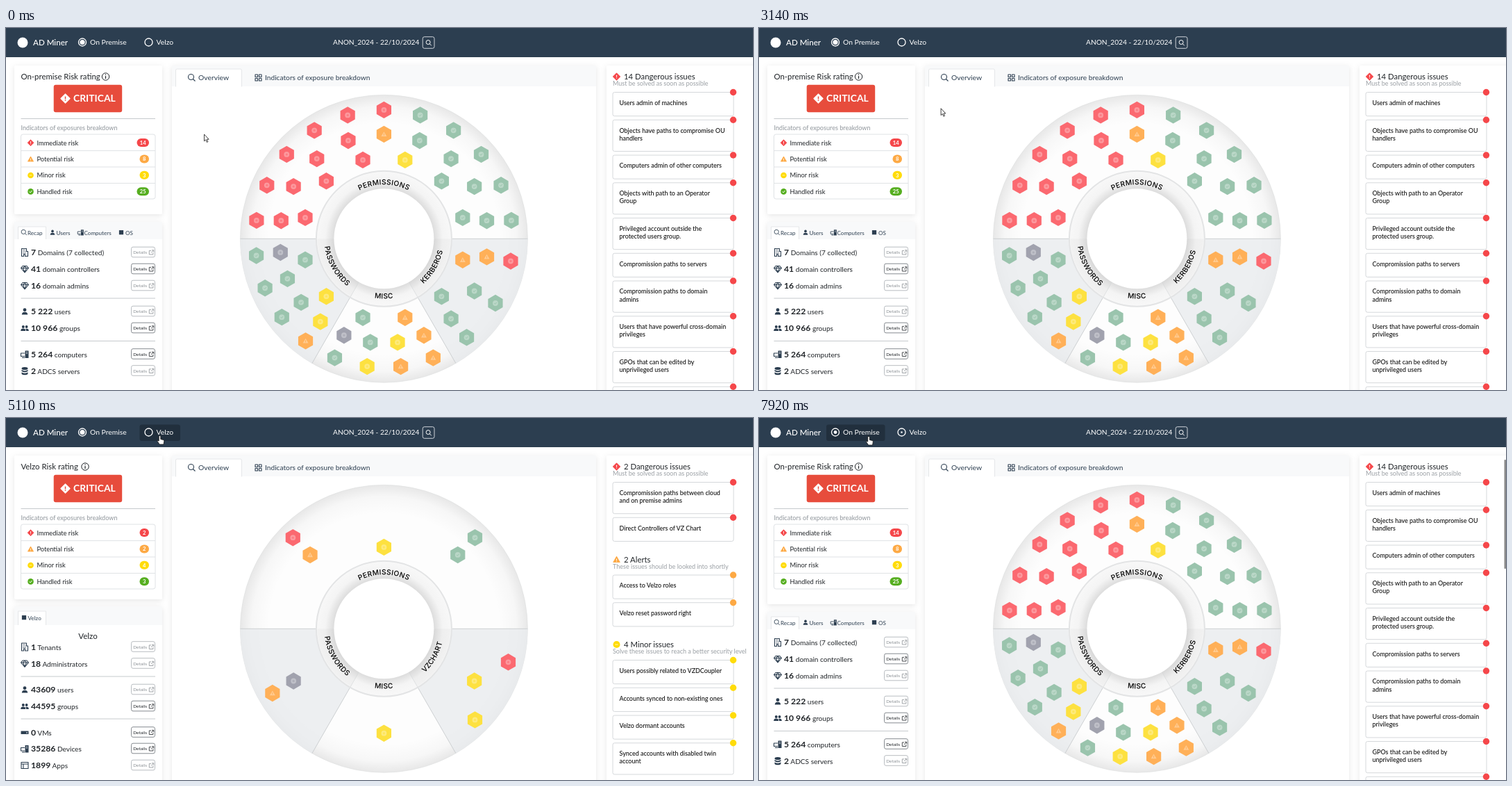
Recreate the animation shown at these times as an HTML page. Size 1076 px wide and 521 px high, loop 7.99 s.

```html
<!DOCTYPE html>
<html lang="en">
<head>
<meta charset="utf-8">
<title>AD Miner dashboard</title>
<style>
  html, body { margin: 0; width: 100%; height: 100%; overflow: hidden; background: #fff; }
  svg { display: block; width: 100vw; height: 100vh; font-family: Lato, sans-serif; }
  .card { fill: #fff; filter: drop-shadow(0 2px 4px rgba(0,0,0,.1)); }
  .line { fill: none; stroke: #2c3e50; stroke-width: 1.1; stroke-linejoin: round; }
  .arc { font: 500 10.2px Inter, sans-serif; letter-spacing: .35px; text-anchor: middle; }
</style>
</head>
<body>
<svg id="stage" viewBox="0 0 1076 521"></svg>
<script>
const LOOP = 7990, CX = 544.4, CY = 303.3, NAVY = '#2c3e50', INK = '#212529', MUTED = '#8f959b';
const RISK = { r: '#f5474a', o: '#fda944', y: '#ffdc0a', g: '#56ae20' };
const HEX = { r: '#fb6970', o: '#ffb058', y: '#fde140', g: '#9ac4ad', x: '#a1a2ae' };

const text = (x, y, s, size, fill = NAVY, extra = '') =>
  `<text x="${x}" y="${y}" font-size="${size}" fill="${fill}" ${extra}>${s}</text>`;
const rect = (x, y, w, h, fill, extra = '') =>
  `<rect x="${x}" y="${y}" width="${w}" height="${h}" fill="${fill}" ${extra}/>`;
const circle = (x, y, r, fill, extra = '') =>
  `<circle cx="${x}" cy="${y}" r="${r}" fill="${fill}" ${extra}/>`;
const path = (d, extra = '') => `<path d="${d}" ${extra}/>`;
const at = (x, y, body, scale = 1) => `<g transform="translate(${x} ${y}) scale(${scale})">${body}</g>`;
const polar = (r, deg) => [CX + r * Math.cos(deg * Math.PI / 180), CY + r * Math.sin(deg * Math.PI / 180)];
const rule = y => path(`M21.5 ${y}H215`, 'stroke="#c6cacd"');

// Outline icons, centred on 0,0 in a box of about 12 px
const line = d => path(d, 'class="line"');
const solid = d => path(d, `fill="${NAVY}"`);
const ICONS = {
  search: line('M2 2L5 5M3 -1A4 4 0 1 1 -5 -1A4 4 0 1 1 3 -1'),
  grid: line('M-4.5-4.5h3.5v3.5h-3.5zM1-4.5h3.5v3.5H1zM1 1h3.5v3.5H1zM-4.5 1h3.5v3.5h-3.5z'),
  building: line('M-4.5 5.5v-11h7v4h2v7h-4v-3h-2v3z') +
    path('M-2.5-3.5h3M-2.5-1.2h4.5M-2.5 1h4.5', 'class="line" stroke-dasharray="1.2 .8"'),
  gem: line('M-3-4.5h6l2.5 3L0 5l-5.5-6.5zM-5.5-1.5h11M-2.5-1.5L0 4.5 2.5-1.5 0-4.5z'),
  person: circle(0, -2.3, 2.4, NAVY) + solid('M-4.2 4.5q0-3.8 4.2-3.8t4.2 3.8z'),
  people: circle(-2.2, -2, 2, NAVY) + circle(2.6, -2, 1.9, NAVY) + solid('M-5.8 4q0-3.4 3.5-3.4T1.2 4zM2 4q0-2-1-3 4.8-1 4.8 3z'),
  computer: line('M0-1.5h-5.5v4.5H0M-4 5h4') + solid('M.5-5h5v10.5h-5z') + path('M2-3h2M2-1h2', 'stroke="#fff" stroke-width=".8"'),
  database: solid('M-4.5-3.5q0-2 4.5-2t4.5 2-4.5 2-4.5-2zm0 2q4.5 2.8 9 0v2q-4.5 2.8-9 0zm0 3.5q4.5 2.8 9 0v1.8q0 2-4.5 2t-4.5-2z'),
  drive: solid('M-5.5-2h11v4.5h-11z') + path('M2 .5h2', 'stroke="#fff"'),
  panel: line('M-5-4.5H5v9H-5zM-5-2H5M-2-2v6.5'),
  square: rect(-4, -4, 8, 8, NAVY)
};
const icon = (name, x, y, scale = 1) => at(x, y, ICONS[name], scale);

function riskIcon(kind, x, y, size, fill = RISK[kind], mark = '#fff') {
  const stroke = `fill="none" stroke="${mark}" stroke-width="1.3"`;
  const bang = path('M0-2.6V.6M0 1.6V2.9', stroke);
  const shape = {
    r: path('M0-5.8L5.8 0 0 5.8-5.8 0z', `fill="${fill}" stroke="${fill}" stroke-linejoin="round"`) + bang,
    o: path('M0-4.8L5.3 4.5H-5.3z', `fill="${fill}" stroke="${fill}" stroke-linejoin="round"`) + at(0, 1.2, bang, .85),
    y: circle(0, 0, 5.6, fill) + path('M-2.4 0h4.8', stroke + ' opacity=".6"'),
    g: circle(0, 0, 5.6, fill) + path('M-2.5 0L-.6 2 2.6-1.8', stroke)
  };
  return at(x, y, shape[kind], size / 6);
}

function hexagon(kind, x, y) {
  const glyph = kind === 'o'
    ? path('M0-3.6L4 3.2H-4z', 'fill="#fff" opacity=".34"') + path('M0-1.2V2', 'stroke="#ffb058"')
    : circle(0, 0, 3.9, '#fff', 'opacity=".32"') + (kind === 'g'
      ? path('M-1.7 0L-.4 1.3 1.8-1.2', 'fill="none" stroke="#9ac4ad"')
      : circle(0, 0, 1.5, HEX[kind], 'opacity=".6"'));
  return at(x, y, path('M0-12.2L10.6-6.1V6.1L0 12.2-10.6 6.1V-6.1z', `fill="${HEX[kind]}"`) + glyph);
}

function wedge(from, to, r, fill) {
  return path(`M${CX} ${CY}L${polar(r, from)}A${r} ${r} 0 0 1 ${polar(r, to)}z`, `fill="${fill}"`);
}

let arcCount = 0;
function arcLabel(label, mid, r, turn) {
  const id = 'arc' + arcCount++;
  return path(`M${polar(r, mid - 70 * turn)}A${r} ${r} 0 0 ${turn > 0 ? 1 : 0} ${polar(r, mid + 70 * turn)}`, `id="${id}" fill="none"`) +
    `<text class="arc"><textPath href="#${id}" startOffset="50%">${label}</textPath></text>`;
}

// Each sector: label, start angle, span, rows of hexagons from the rim inwards
function wheel(sectors) {
  const shade = 'rgba(234,236,239,.78)';
  let out = circle(CX, CY, 207, '#fdfdfd') + circle(CX, CY, 207, 'url(#rim)', 'stroke="#dedfe0" stroke-width=".6"') +
    wedge(0, 60, 207, shade) + wedge(120, 180, 207, shade);
  for (const a of [0, 60, 120, 180]) out += path(`M${polar(98, a)}L${polar(207, a)}`, 'stroke="#cdd0d2"');
  out += circle(CX, CY, 98, 'url(#ring)') + wedge(0, 60, 96, 'rgba(0,0,0,.025)') + wedge(120, 180, 96, 'rgba(0,0,0,.025)');
  for (const a of [60, 120]) out += path(`M${polar(72, a)}L${polar(97, a)}`, 'stroke="#d6d8da" stroke-width=".7"');
  out += circle(CX, CY, 97.5, 'none', 'stroke="#e3e4e5" stroke-width="2"') + circle(CX, CY, 72, '#fff');
  for (const [label, start, span, ...rows] of sectors) {
    out += span > 90 ? arcLabel(label, 270, 78, 1) : arcLabel(label, start + span / 2, 86.2, -1);
    rows.forEach((row, i) => [...row].forEach((kind, k) => {
      out += hexagon(kind, ...polar([185.4, 150.4, 117.4][i], start + (k + .5) * span / row.length));
    }));
  }
  return out;
}

function ratingCard(title, infoX, bottom, counts) {
  let out = rect(12, 54, 213, bottom - 54, '#fff', 'class="card" rx="2"') +
    text(21.5, 74, title, 11.4, INK) + circle(infoX, 70, 5.2, 'none', `stroke="${INK}"`) +
    path(`M${infoX} 69v4M${infoX} 66.6v1.2`, `stroke="${INK}" stroke-width="1.2"`) +
    rect(68.7, 81.8, 98.5, 39.4, '#e74c3c', 'rx="3"') + riskIcon('r', 85.5, 101.5, 6.8, '#fff', '#e74c3c') +
    text(97, 106.4, 'CRITICAL', 13.9, '#fff', 'font-weight="700"') + rule(130.5) +
    text(21.5, 146.5, 'Indicators of exposures breakdown', 9.1, MUTED) +
    rect(21.5, 153, 193.5, 93, '#fff', 'rx="3" stroke="#dfe2e5"');
  ['Immediate risk', 'Potential risk', 'Minor risk', 'Handled risk'].forEach((name, i) => {
    const y = 165 + i * 23.4, kind = 'royg'[i], w = counts[i] > 9 ? 17.5 : 13.5;
    if (i) out += path(`M21.5 ${y - 11.8}H215`, 'stroke="#dfe2e5"');
    out += riskIcon(kind, 35.5, y + .2, 4.6) + text(44.5, y + 3.6, name, 9.3, INK) +
      rect(206 - w, y - 6, w, 12, RISK[kind], 'rx="6"') +
      text(206 - w / 2, y + 2.8, counts[i], 7.6, '#fff', 'font-weight="700" text-anchor="middle"');
  });
  return out;
}

function statRow(y, symbol, value, label, active) {
  const color = active ? INK : '#8b9095';
  return icon(symbol, 27, y) + `<text x="36" y="${y + 4.3}" font-size="10.1" fill="${INK}">` +
    `<tspan font-size="12.2" font-weight="700">${value}</tspan> ${label}</text>` +
    rect(180.5, y - 7.8, 34, 14.6, '#fff', `rx="2.5" stroke="${active ? '#868b90' : '#b9bdc1'}"`) +
    text(183.2, y + 2, 'Details', 6.5, color) +
    path(`M209 ${y - 2.6}h-2.7v5.6h5.6v-2.7M210 ${y - 3.2}h2.7v2.7M212.5 ${y - 3}l-3.6 3.6`, `fill="none" stroke="${color}" stroke-width=".8"`);
}

function statsCard(top, stripBottom, tabs, rows, rules) {
  let out = rect(12, top, 213, 260, '#fff', 'class="card" rx="2"') + rect(12, top, 213, stripBottom - top, '#f8f9fa') +
    path(`M17.5 ${stripBottom}V${top + 7}H57.5V${stripBottom}`, 'fill="#fff" stroke="#e5e7e9"');
  const y = (top + 7 + stripBottom) / 2 - .8;
  for (const [symbol, x, name, labelX] of tabs) out += icon(symbol, x, y, .78) + text(labelX, y + 3.3, name, 8.1);
  return out + rows.map(r => statRow(...r)).join('') + rules.map(rule).join('');
}

// Each section: risk kind, title, note, issues with "|" as line break
function issuePanel(sections) {
  let out = rect(865, 54, 230, 480, '#fff', 'class="card"'), y = 70;
  for (const [kind, title, note, issues] of sections) {
    out += riskIcon(kind, 879.5, y, 5.4) + text(890, y + 4.2, title, 11.35, INK) + text(874, y + 13.3, note, 9.02, '#9a9fa4');
    y += 22.5;
    for (const issue of issues) {
      const lines = issue.split('|'), h = 23.2 + lines.length * 11;
      out += rect(874, y, 174, h, '#fff', 'rx="2.5" stroke="#d5d8db"') + circle(1047.5, y, 4.7, RISK[kind]);
      lines.forEach((s, i) => out += text(883.5, y + 18.3 + i * 11.4, s, 8.95, '#111', 'font-weight="500"'));
      y += h + 5.55;
    }
    y += 20.5;
  }
  return out;
}

const premise = ratingCard('On-premise Risk rating', 143.5, 268, [14, 8, 3, 25]) +
  statsCard(279, 304, [['search', 26, 'Recap', 31], ['person', 67, 'Users', 72.5], ['computer', 107.5, 'Computers', 112.5], ['square', 166, 'OS', 172]], [
    [323, 'building', '7', 'Domains (7 collected)', 0], [347, 'gem', '41', 'domain controllers', 1],
    [371, 'gem', '16', 'domain admins', 0], [408, 'person', '5 222', 'users', 0],
    [432, 'people', '10 966', 'groups', 1], [469.5, 'computer', '5 264', 'computers', 1],
    [493.5, 'database', '2', 'ADCS servers', 0]], [389, 450.5]) +
  wheel([['PERMISSIONS', 180, 180, 'rrrrrrggggg', 'rrrrogggg', 'rrrygg'], ['KERBEROS', 0, 60, 'rgg', 'ogg', 'og'],
    ['MISC', 60, 60, 'ooyg', 'oygx', 'og'], ['PASSWORDS', 120, 60, 'oggg', 'yggx', 'yg']]) +
  issuePanel([['r', '14 Dangerous issues', 'Must be solved as soon as possible', [
    'Users admin of machines', 'Objects have paths to compromise OU|handlers', 'Computers admin of other computers',
    'Objects with path to an Operator|Group', 'Privileged account outside the|protected users group.',
    'Compromission paths to servers', 'Compromission paths to domain|admins',
    'Users that have powerful cross-domain|privileges', 'GPOs that can be edited by|unprivileged users', '']]]);

const cloud = ratingCard('Velzo Risk rating', 114, 261, [2, 2, 4, 3]) +
  statsCard(271, 298, [['square', 26, 'Velzo', 31.5]], [
    [329.5, 'building', '1', 'Tenants', 0], [353.5, 'gem', '18', 'Administrators', 0],
    [391, 'person', '43609', 'users', 0], [415, 'people', '44595', 'groups', 1],
    [452.5, 'drive', '0', 'VMs', 1], [476, 'computer', '35286', 'Devices', 1],
    [500, 'panel', '1899', 'Apps', 0]], [372, 433]) + text(118, 318, 'Velzo', 11.5, INK, 'text-anchor="middle"') +
  wheel([['PERMISSIONS', 180, 180, 'rg', 'og', 'y'], ['VZCHART', 0, 60, 'ry', 'y'],
    ['MISC', 60, 60, '', 'y'], ['PASSWORDS', 120, 60, 'o', 'x']]) +
  issuePanel([
    ['r', '2 Dangerous issues', 'Must be solved as soon as possible', ['Compromission paths between cloud|and on premise admins', 'Direct Controllers of VZ Chart']],
    ['o', '2 Alerts', 'These issues should be looked into shortly', ['Access to Velzo roles', 'Velzo reset password right']],
    ['y', '4 Minor issues', 'Solve these issues to reach a better security level', ['Users possibly related to VZDCoupler',
      'Accounts synced to non-existing ones', 'Velzo dormant accounts', 'Synced accounts with disabled twin|account']]]);

const radio = (x, id) => circle(x, 20.5, 5.5, 'none', 'stroke="#fff" stroke-width="1.3"') + circle(x, 20.5, 0, '#fff', `id="${id}"`);
const stage = document.getElementById('stage');
stage.innerHTML = `<defs>
  <radialGradient id="rim"><stop offset=".8" stop-opacity="0"/><stop offset=".92" stop-opacity=".025"/><stop offset="1" stop-opacity=".085"/></radialGradient>
  <radialGradient id="ring"><stop offset=".73" stop-color="#dcdcdc"/><stop offset=".86" stop-color="#f4f4f4"/><stop offset="1" stop-color="#f8f8f8"/></radialGradient>
  </defs>` +
  rect(239, 54, 611, 480, '#fff', 'class="card"') + rect(239, 54, 611, 30, '#f8f9fa') +
  path('M244.5 84.5V61q0-2 2-2h91q2 0 2 2v23.5', 'fill="#fff" stroke="#e5e7e9"') +
  icon('search', 267.5, 71.5) + text(277, 75.2, 'Overview', 10.35) +
  icon('grid', 363.5, 71.5) + text(373, 75.2, 'Indicators of exposure breakdown', 10.2) +
  `<g id="premise">${premise}</g><g id="cloud">${cloud}</g>` +
  rect(1073.5, 60, 2.5, 157, '#8b8b8b', 'id="scrollbar" rx="1"') +
  rect(0, 0, 1076, 42, NAVY) +
  rect(97, 9.5, 84.5, 23.5, '#212f3d', 'id="premiseHover" rx="3"') + rect(192.5, 9.5, 58.5, 23.5, '#212f3d', 'id="cloudHover" rx="3"') +
  circle(24, 21, 7.5, '#fff') + text(39, 24.8, 'AD Miner', 11.6, '#fff', 'font-weight="500"') +
  radio(110, 'premiseDot') + text(121, 24.3, 'On Premise', 10.35, '#fff') +
  radio(205.5, 'cloudDot') + text(216.5, 24.3, 'Velzo', 10.35, '#fff') +
  text(471, 24.3, 'ANON_2024 - 22/10/2024', 10.2, '#fff') +
  rect(600.2, 12.7, 16.8, 16.6, 'none', 'rx="2.5" stroke="#dfe3e7" stroke-width=".9"') +
  at(608.8, 21.3, path('M1.5 1.5L4 4M2.3 -.8A3 3 0 1 1 -3.7 -.8A3 3 0 1 1 2.3 -.8', 'fill="none" stroke="#fff"')) +
  `<g id="cursor" fill="#fff" stroke="#111" stroke-width=".8" stroke-linejoin="round">` +
  path('M0 0V9.8L2.2 7.8 3.8 11.4 5.4 10.7 3.8 7.2H6.7z', 'id="arrow"') +
  path('M-1.3 1.2a1.3 1.3 0 0 1 2.6 0V5l4 1q1.2.4 1 1.7L5.6 12.5H-.4L-3.4 8q-.6-1.9 2.1-.5z', 'id="hand"') + '</g>';

const el = id => document.getElementById(id);
const show = (id, on) => el(id).style.display = on ? '' : 'none';
const clamp = v => Math.min(1, Math.max(0, v));
const easeOut = (t, start, length) => 1 - (1 - clamp((t - start) / length)) ** 3;

// Pointer keys: time, x, y
const POINTER = [[0, 285.5, 153], [20, 285.5, 153], [200, 297, 157], [330, 306, 154], [2270, 306, 154], [2330, 296, 160.5], [2520, 285, 164],
  [2740, 282, 162], [2880, 282, 162], [3570, 220, 18], [3700, 223.5, 28], [3770, 223, 27], [3830, 221.5, 25.5],
  [5710, 221.5, 25.5], [6460, 158, 26.5], [LOOP, 158, 26.5]];

function pointerAt(t) {
  const i = POINTER.findIndex(k => k[0] > t), [t0, x0, y0] = POINTER[i - 1], [t1, x1, y1] = POINTER[i];
  const p = (t - t0) / (t1 - t0), e = p * p * (3 - 2 * p);
  return [x0 + (x1 - x0) * e, y0 + (y1 - y0) * e];
}

function draw(t) {
  const [x, y] = pointerAt(t);
  const onCloud = t >= 5110 && t < 7860;
  show('premise', !onCloud);
  show('cloud', onCloud);
  show('scrollbar', t >= 7860);

  const checked = easeOut(t, 5110, 200) - easeOut(t, 7860, 200);
  el('cloudDot').setAttribute('r', 3.6 * checked);
  el('premiseDot').setAttribute('r', 3.6 * (1 - checked));

  const inBar = y > 9.5 && y < 33;
  const overPremise = inBar && x > 97 && x < 181.5, overCloud = inBar && x > 192.5 && x < 251;
  show('premiseHover', overPremise);
  show('cloudHover', overCloud);
  show('hand', overPremise || overCloud);
  show('arrow', !overPremise && !overCloud);
  el('cursor').setAttribute('transform', `translate(${x} ${y})`);
}

const began = performance.now();
function tick() {
  draw((performance.now() - began) % LOOP);
  requestAnimationFrame(tick);
}
tick();
</script>
</body>
</html>
```
